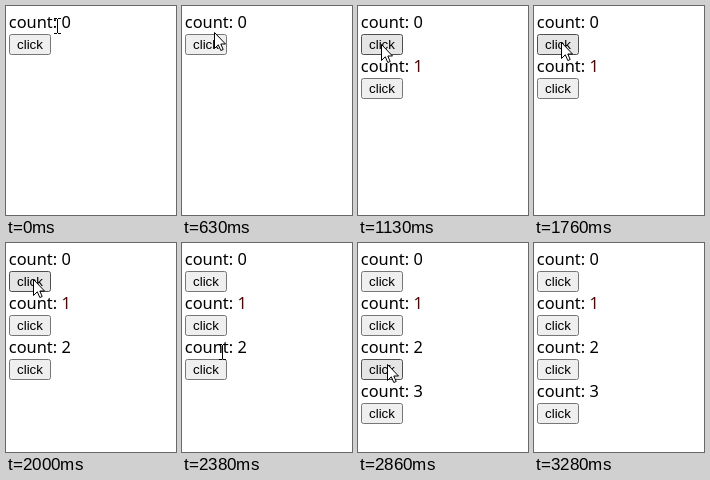
These frames come from a looping animation (170x209 px, 3670 ms). An HTML page:

```html
<!DOCTYPE html>
<html lang="en">
<head>
<meta charset="utf-8">
<title>Counters</title>
<style>
  html, body { margin: 0; width: 100%; height: 100%; overflow: hidden; background: #fff; }
  svg { display: block; width: 170px; height: 209px; }
  .count { font: 16.4px "Noto Sans", "Open Sans", sans-serif; fill: #000; }
  .warm { fill: #4a0808; }
  .label { font: 13.333px "Liberation Sans", Arial, sans-serif; fill: #000; }
  rect { fill: #efefef; stroke: #767676; }
  .hover rect { fill: #e5e5e5; stroke: #4f4f4f; }
  .press rect { fill: #f5f5f5; stroke: #8d8d8d; }
</style>
</head>
<body>
<svg viewBox="0 0 170 209">
  <g id="rows"></g>
  <path id="arrow" d="M.5 .5V16.5L4.3 12.8L6.8 18.5L9.2 17.5L6.8 12H11.5Z" fill="#fff" stroke="#000"/>
  <path id="beam" d="M0 .5H3M4 .5H7M3.5 1V15M0 15.5H3M4 15.5H7" fill="none" stroke="#000"/>
</svg>
<script>
  const LOOP = 3670, ROW = 44;
  // time, cursor, x, y, rows shown, active row, its state
  const steps = [
    [0, 'beam', 48, 12, 1],
    [150, 'beam', 58, 7, 1],
    [270, 'arrow', 77, 0, 1],
    [390, 'arrow', 70, 4, 1],
    [510, 'beam', 47, 10, 1],
    [630, 'arrow', 32, 26, 1],
    [770, 'arrow', 26, 34, 1, 0, 'hover'],
    [890, 'arrow', 23, 38, 1, 0, 'hover'],
    [1010, 'arrow', 23, 38, 1, 0, 'press'],
    [1130, 'arrow', 23, 38, 2, 0, 'hover'],
    [1520, 'arrow', 25, 37, 2, 0, 'hover'],
    [1640, 'arrow', 27, 36, 2, 0, 'hover'],
    [1880, 'arrow', 27, 36, 2, 0, 'press'],
    [2000, 'arrow', 27, 36, 3, 0, 'hover'],
    [2120, 'beam', 35, 54, 3],
    [2240, 'arrow', 46, 90, 3],
    [2380, 'beam', 37, 101, 3],
    [2500, 'arrow', 31, 118, 3, 2, 'hover'],
    [2620, 'arrow', 29, 121, 3, 2, 'hover'],
    [2740, 'arrow', 29, 121, 3, 2, 'press'],
    [2860, 'arrow', 29, 121, 4, 2, 'hover'],
    [3010, 'arrow', 57, 160, 4],
    [3130, 'arrow', 86, 194, 4],
    [3280, 'none', 0, 0, 4]
  ];

  const $ = id => document.getElementById(id);
  const cursors = { arrow: $('arrow'), beam: $('beam') };

  $('rows').innerHTML = [0, 1, 2, 3].map(n => `
    <g transform="translate(0 ${n * ROW})">
      <text class="count" x="2.8" y="22">count: <tspan class="${n === 1 ? 'warm' : ''}">${n}</tspan></text>
      <rect x="3.5" y="28.5" width="41" height="20" rx="2"/>
      <text class="label" x="11" y="43">click</text>
    </g>`).join('');
  const rows = [...$('rows').children];

  const start = performance.now();
  let shown;

  function draw(now) {
    const t = Math.max(0, now - start) % LOOP;
    const step = steps.findLast(s => s[0] <= t);
    if (step !== shown) {
      shown = step;
      const [, kind, x, y, count, active, state] = step;
      rows.forEach((row, i) => {
        row.style.display = i < count ? '' : 'none';
        row.setAttribute('class', i === active ? state : '');
      });
      for (const name in cursors) {
        cursors[name].style.display = name === kind ? '' : 'none';
        cursors[name].setAttribute('transform', `translate(${x} ${y})`);
      }
    }
    requestAnimationFrame(draw);
  }
  draw(start);
</script>
</body>
</html>
```
